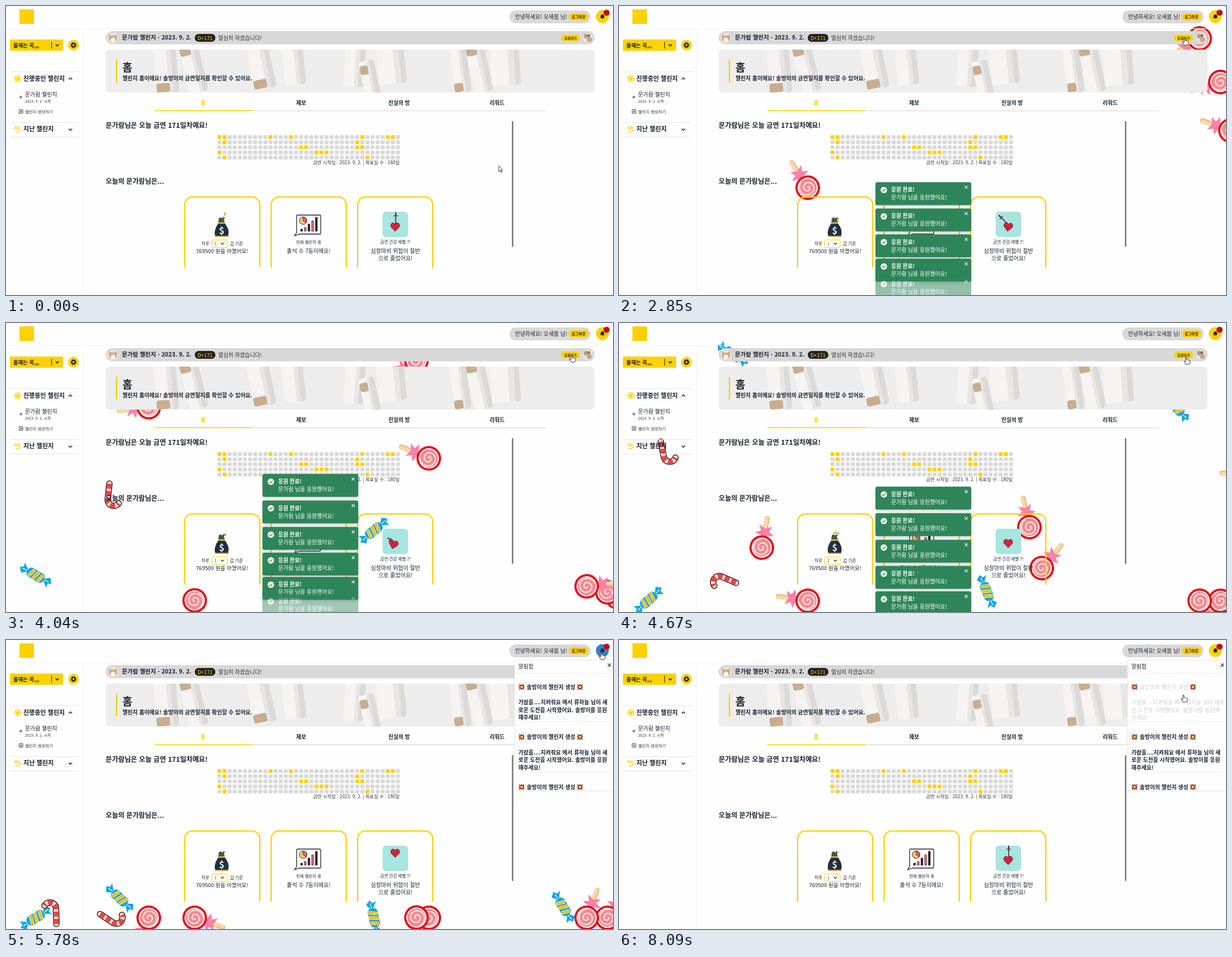
These frames come from a looping animation (1084x517 px, 8.16 s). An HTML page:

```html
<!DOCTYPE html>
<html lang="ko">
<head>
<meta charset="utf-8">
<style>
html, body { margin: 0; width: 100%; height: 100%; overflow: hidden; background: #fefefe }
svg { display: block; width: 1084px; height: 517px; font-family: "Noto Sans CJK KR", "Noto Sans KR", "Noto Sans CJK", sans-serif }
text { white-space: pre }
.toast { filter: drop-shadow(0 2px 3px #0003) }
</style>
</head>
<body>
<svg id="stage" viewBox="0 0 1084 517"></svg>
<script>
const LOOP = 8160, YELLOW = '#ffd100', INK = '#1a202c';
const stage = document.getElementById('stage');

const text = (x, y, size, str, weight = 400, fill = INK, anchor = 'start') =>
  `<text x="${x}" y="${y}" font-size="${size}" font-weight="${weight}" fill="${fill}" text-anchor="${anchor}">${str}</text>`;
const rect = (x, y, w, h, fill, r = 0, more = '') =>
  `<rect x="${x}" y="${y}" width="${w}" height="${h}" rx="${r}" fill="${fill}" ${more}/>`;
const circle = (x, y, r, fill, more = '') => `<circle cx="${x}" cy="${y}" r="${r}" fill="${fill}" ${more}/>`;
const line = (d, stroke = INK, w = 1, more = '') =>
  `<path d="${d}" fill="none" stroke="${stroke}" stroke-width="${w}" ${more}/>`;
const shape = (d, fill, more = '') => `<path d="${d}" fill="${fill}" ${more}/>`;
const place = (x, y, angle, body, opacity = 1) =>
  `<g transform="translate(${x} ${y}) rotate(${angle})" opacity="${opacity}">${body}</g>`;
const chevron = (x, y, s, w = 1.4) => line(`M${x - 3} ${y - 1.5 * s}l3 ${3 * s}l3 ${-3 * s}`, INK, w);
const cross = (x, y, c, s = 2.5) => line(`M${x - s} ${y - s}l${2 * s} ${2 * s}m0 ${-2 * s}l${-2 * s} ${2 * s}`, c, 1.1);

// ---- page ----
function topBar() {
  return line('M0 40.5H1084M138.5 40V517', '#f1f1f1') +
    rect(24, 6, 26, 26, YELLOW) +
    rect(899, 8, 145, 23, '#d9d9d9', 11.5) +
    text(909, 23, 9.8, '안녕하세요! 오새봄 님!', 500) +
    rect(1005, 13, 35, 12.5, YELLOW, 6) + text(1022.5, 22, 6.7, '로그아웃', 700, INK, 'middle');
}

function sidebar() {
  return rect(7, 60, 95, 20, YELLOW, 1) + text(13, 73.5, 9.4, '올해는 꼭,,,', 700) +
    line('M81.5 64V76') + chevron(91.5, 70, 1, 1.6) +
    circle(120.5, 70, 9.5, YELLOW) +
    circle(120.5, 70, 2.9, 'none', `stroke="${INK}" stroke-width="2"`) +
    circle(120.5, 70, 4.2, 'none', `stroke="${INK}" stroke-width="1.6" stroke-dasharray="1.9 1.4"`) +
    line('M7 117.5H130M7 208.5H130M7 234.5H130', '#e2e6ea') +
    circle(21, 130, 5.3, '#fff6cc', `stroke="${YELLOW}" stroke-width="1.3"`) +
    shape('M21 127l3 2.2l-1.2 3.5h-3.6l-1.2-3.5z', YELLOW) +
    line('M21 127v-2M24 129l2-1M22.8 133l1 2M19.2 133l-1 2M18 129l-2-1', YELLOW) +
    text(31, 134, 11, '진행중인 챌린지', 700) + chevron(115, 130, -1) +
    circle(26.5, 163, 2.4, '#8a8a8a') +
    text(34, 162, 9.9, '문가람 챌린지', 500) + text(34, 172.5, 6.75, '2023. 9. 2. 시작', 400, '#333') +
    line('M23.5 185.5h6.5v6.5h-6.5zM24.8 188.8h4M26.8 186.8v4', '#333', .9) +
    text(34, 191.5, 7.4, '챌린지 생성하기', 400, '#333') +
    line('M17 218a4.7 4.7 0 1 1 0 5.5M15.5 215.5l1 3.5h3.5M21.5 218v3l2 1', YELLOW, 1.3) +
    text(31, 224, 11.1, '지난 챌린지', 700) + chevron(115, 221, 1);
}

function banner() {
  // x, y, tilt, width, coloured end (-1 top, 1 bottom)
  const sticks = [[281, 112, -5, 30, 1], [330, 112, -14, 24, -1], [450, 106, -12, 30, 1], [508, 98, -6, 28, -1],
    [618, 100, 4, 26, 0], [648, 146, -12, 18, -1], [682, 96, -6, 40, 0], [806, 112, -8, 20, 1],
    [840, 112, -12, 24, -1], [886, 98, -4, 42, 0]];
  const stick = ([x, y, tilt, w, end]) => place(x, y, tilt,
    rect(w / 2 - 4, -48, 14, 92, '#dcdad8', 6) + rect(-w / 2, -48, w, 92, '#f5f4f2', 3) +
    rect(w / 4, -48, w / 4, 92, '#e8e6e4', 3) +
    (end ? rect(-w / 2, end > 0 ? 26 : -40, w * .8, 16, '#c8ad90', 4) : ''));
  return `<clipPath id="frame">${rect(178, 78, 873, 77, '#000', 7)}</clipPath><g clip-path="url(#frame)">` +
    rect(178, 78, 873, 77, '#ededed') + sticks.map(stick).join('') +
    '</g>' + rect(196, 96, 2.5, 41, YELLOW) +
    text(208, 117, 19, '홈', 700) +
    text(208, 133, 9.85, '챌린지 홈이에요! 솔방이의 금연일지를 확인할 수 있어요.', 700);
}

function challengeBar() {
  return rect(178, 45, 873, 23.5, '#d8d8d8', 11.7) +
    circle(191, 57, 9.3, '#e9e2d8') + shape('M184 51l4 2h6l4-2v9q-7 8-14 0z', '#d2aa84') +
    shape('M187 59q4-5 8 0l-1 5h-6z', '#fff8ee') +
    text(207, 60, 10.5, '문가람 챌린지 - 2023. 9. 2.', 700) +
    rect(337, 50, 37, 14, '#222', 7) + text(355.5, 60.5, 9.3, 'D+171', 400, YELLOW, 'middle') +
    text(379, 60.5, 9.75, '열심히 하겠습니다!', 400, '#333') +
    rect(991, 51, 34, 12, YELLOW, 6) + text(1008, 59.5, 6, '응원하기', 700, INK, 'middle') +
    circle(1039, 57, 9, '#e8e2d8') + circle(1036, 54, 4, '#b39b80') + circle(1042, 60, 4.5, '#bfa88c') +
    circle(1041, 53, 2.5, '#857260');
}

function tabs() {
  const names = ['홈', '제보', '진실의 방', '리워드'];
  return line('M265 187.5H964', '#d5d2c6') + line('M265 187.3H440', YELLOW, 1.4) +
    names.map((name, i) => text(352 + i * 175, 177, 9.7, name, 700, i ? INK : YELLOW, 'middle')).join('');
}

function calendar() {
  const missed = [[0, 1, 10, 14, 28, 33, 34], [1, 27], [16, 17, 27, 28], [0, 19, 20, 21], [1, 29]];
  let out = text(178, 218, 12.2, '문가람님은 오늘 금연 171일차예요!', 700);
  missed.forEach((days, row) => {
    for (let col = 0; col < 36; col++)
      out += rect(377.6 + col * 9.11, 231 + row * 9.15, 7.2, 7, days.includes(col) ? YELLOW : '#d9d9d9', 2);
  });
  return out + text(703, 283, 8.3, '금연 시작일 : 2023. 9. 2. | 목표일 수 : 180일', 400, '#333', 'end') +
    rect(903.5, 206, 2.5, 225, '#757575', 1);
}

function cards() {
  const mid = (x, y, size, str, w = 700) => text(x, y, size, str, w, INK, 'middle');
  const bars = [4, 7, 13, 19, 25].map((h, i) =>
    rect(526 + i * 6.6, 403 - h, 3.6, h, i % 2 ? '#e2607c' : '#222', .5, 'stroke="#222" stroke-width=".6"')).join('');
  return text(178, 318, 12.1, '오늘의 문가람님은...', 700) +
    '<clipPath id="cut"><path d="M300 330H780V468H300z"/></clipPath><g clip-path="url(#cut)">' +
    [319, 473.5, 628].map(x => rect(x, 341.6, 134.2, 150, 'none', 14, `stroke="${YELLOW}" stroke-width="2.3"`)).join('') + '</g>' +
    '<g id="bills"></g>' +
    shape('M379 389h12l-2-8l3-2l-4-1l-2 2l-3-2l-3 2z', '#3d5945') +
    shape('M379 389h12q9 12 6 21q-2 3-12 3t-12-3q-2-9 6-21z', '#20303f') +
    rect(378.5, 387, 13, 2.5, '#e6b84a', 1) + rect(373, 411, 25, 2, '#c99b45', 1) +
    text(385.3, 407.5, 16, '$', 700, '#fff', 'middle') +
    text(349, 428, 7.5, '하루') + rect(367.5, 418.5, 27.5, 13.5, '#fff', 2, `stroke="${YELLOW}"`) +
    text(372, 428, 7.5, '1', 400, '#555') + chevron(386.5, 425, .9, 1.2) + text(400, 428, 7.7, '갑 기준') +
    mid(386, 442, 9.6, '769500 원을 아꼈어요!', 500) +
    shape('M521 374H560q2 0 2 2V406q0 2-2 2H524L515.5 411L519 405V376q0-2 2-2z', '#fff', 'stroke="#222" stroke-width="1.3"') +
    circle(530.5, 384, 6.8, '#f0c56c', 'stroke="#222" stroke-width=".9"') +
    shape('M530.5 384V377.2A6.8 6.8 0 0 1 536 388z', '#e2607c', 'stroke="#222" stroke-width=".7"') + bars +
    mid(540.5, 425, 7.4, '전체 챌린저 중', 400) + mid(540.5, 442, 9.9, '출석 수 7등이에요!', 500) +
    rect(672.5, 368, 45.5, 45.5, '#a7e5df', 6) + '<g id="heart"></g>' +
    mid(695.5, 425, 7.5, '금연 건강 레벨 7!', 400) +
    mid(695.5, 442, 9.95, '심장마비 위험이 절반', 500) + mid(695.5, 455, 10, '으로 줄었어요!', 500);
}

stage.innerHTML = '<g id="candies"></g>' + topBar() + sidebar() + challengeBar() + banner() + tabs() + calendar() + cards() +
  ['toasts', 'drawer', 'bell', 'cursor'].map(id => `<g id="${id}"></g>`).join('');

// ---- motion ----
const show = (id, html) => { document.getElementById(id).innerHTML = html; };

// Interpolates rows of [time, ...values].
function tween(rows, t) {
  let i = 0;
  while (i < rows.length - 2 && t >= rows[i + 1][0]) i++;
  const [a, b] = [rows[i], rows[i + 1]];
  const u = Math.min(1, Math.max(0, (t - a[0]) / (b[0] - a[0]))), e = u * u * (3 - 2 * u);
  return a.slice(1).map((v, k) => v + (b[k + 1] - v) * e);
}

const swirl = Array.from({ length: 42 }, (_, i) => {
  const a = i * .3, r = 1 + i * .36;
  return `${i ? 'L' : 'M'}${(r * Math.cos(a)).toFixed(1)} ${(r * Math.sin(a)).toFixed(1)}`;
}).join('');
const caneLine = 'M21 1L-7 -8A11 11 0 0 0 -17 10';
const sweets = {
  lolli: line('M20 0H53', '#e9bd85', 9, 'stroke-linecap="round"') + line('M20 -1H53', '#f8d9a8', 6, 'stroke-linecap="round"') +
    shape('M20 0L25 -17L30 -7L40 -12L35 0L40 12L30 7L25 17z', '#f882a8') +
    circle(0, 0, 22, '#e60a18') + circle(0, 0, 18, '#fff') + circle(0, 0, 16, '#f58a92') + line(swirl, '#fde0dd', 2.4),
  wrap: shape('M-14 0L-28 -10L-26 -3L-32 1L-25 9zM14 0L28 10L26 3L32 -1L25 -9z', '#12a5e2') +
    line('M-16 0L-27 1M16 0L27 -1', '#fff', 1.2) + rect(-17, -9, 34, 18, '#12a5e2', 7) +
    line('M-11 8L-6 -8M-2 9L3 -9M8 8L12 -7', '#fff', 6) + line('M-11 8L-6 -8M-2 9L3 -9M8 8L12 -7', '#fbc000', 4.6),
  cane: line(caneLine, '#3b2228', 11.5, 'stroke-linecap="round"') + line(caneLine, '#fbe3c0', 8.5, 'stroke-linecap="round"') +
    line(caneLine, '#e0464f', 8.5, 'stroke-dasharray="9 4"')
};
// kind, x, start time, starting angle
const candies = [
  ['lolli', 337, 2147, 110], ['lolli', 1092, 2387, 72], ['lolli', 1074, 2547, 35], ['lolli', 1037, 2670, 22],
  ['wrap', 53, 2829, 59], ['wrap', 657, 3196, 169], ['cane', 188, 3382, -73], ['lolli', 755, 3537, 232],
  ['lolli', 255, 3712, 202], ['lolli', 733, 3846, 179], ['lolli', 1130, 4107, 102], ['cane', 84, 4190, 162],
  ['wrap', 995, 4342, 150], ['wrap', 203, 4493, -45]];

function drawCandies(t) {
  return candies.filter(c => t > c[2] && t < 7500).map(([kind, x, start, angle]) => {
    const left = Math.max(0, 1 - (t - start) / 2130);
    return place(x, 497 - 573 * left ** 3, angle + t * .171, sweets[kind]);
  }).join('');
}

function drawBills(t) {
  const u = ((t + 250) % 2100) / 1050;
  if (u > 1) return '';
  return [0, 1, 2].map(i => {
    const rise = Math.sin(Math.PI * Math.min(1, Math.max(0, u * 1.2 - i * .1)));
    return place(391 - i * 3, 383 - rise * (14 - i * 3), u * 300 + i * 70,
      rect(-3, -1.5, 6, 3, i % 2 ? '#f6d9a8' : '#f0a648', 1));
  }).join('');
}

// phase, sword x, y, angle, opacity, heart x, y, angle
const stab = [
  [0, 696, 380, 0, 1, 695, 395, 0], [300, 696, 374, 0, 0, 695, 394, 0], [600, 680, 376, -45, 0, 695, 394, 0],
  [750, 686, 382, -45, 1, 695, 395, 8], [1000, 680, 376, -45, 0, 695, 394, 0], [1580, 714, 370, 135, 0, 695, 381, 0],
  [1660, 708, 379, 135, 1, 695, 394, 0], [1790, 696, 379, 0, 1, 695, 394, 0], [1940, 690, 391, -50, 1, 692, 396, 15],
  [2100, 696, 380, 0, 1, 695, 395, 0]];
const sword = rect(-1, -4, 2, 14, '#4d4f63') + rect(-4, -5.5, 8, 1.8, '#8a2b4c', 1) + rect(-1, -11, 2, 6, '#3a2438');
const heart = shape('M0 8L-7.5 0Q-9 -6 -4 -7Q-1 -7 0 -4Q1 -7 4 -7Q9 -6 7.5 0z', '#e8203c', 'stroke="#4a1420" stroke-width=".9"') +
  circle(-2.8, -1, .8, INK) + circle(2.8, -1, .8, INK) + line('M-1.3 1.5q1.3 1.3 2.6 0', INK, .7);

function drawHeart(t) {
  const [sx, sy, sa, so, hx, hy, ha] = tween(stab, t % 2100);
  return place(sx, sy, sa, sword, so) + place(hx, hy, ha, heart);
}

const cheers = Array.from({ length: 11 }, (_, i) => 1820 + i * 240);
const push = age => 47.7 * (1 - .6 * Math.exp(-age / 40) - .4 * Math.exp(-age / 240));

function drawToasts(t) {
  const LIFE = 1480;
  return cheers.filter(s => t > s && t < s + LIFE).map(s => {
    const age = t - s;
    let y = 479 + 6 * Math.exp(-age / 250);
    for (const later of cheers) if (later > s && later < t) y -= push(t - later);
    const opacity = Math.min(1, age / 140, (LIFE - age) / 60);
    return `<g class="toast" transform="translate(458 ${y})" opacity="${opacity}">` +
      rect(0, 0, 171, 41, '#2f855a', 3) + circle(15, 14, 5.7, '#fff') + line('M12 14l2.2 2.2l4-4.4', '#2f855a', 1.3) +
      text(28, 17, 9.7, '응원 완료!', 700, '#fff') + text(28, 31, 9.9, '문가람 님을 응원했어요!', 500, '#fff') +
      cross(162, 9, '#fff') + '</g>';
  }).join('');
}

const burst = Array.from({ length: 16 }, (_, i) => {
  const r = i % 2 ? 3 : i % 4 ? 5.3 : 6.5, a = i * Math.PI / 8 + Math.PI / 4;
  return `${i ? 'L' : 'M'}${(r * Math.cos(a)).toFixed(1)} ${(r * Math.sin(a)).toFixed(1)}`;
}).join('') + 'z';
const boom = shape(burst, '#c8231c', 'stroke="#421713" stroke-width=".6"') + circle(0, 0, 2.3, '#ffc83d') + circle(0, 0, 1, '#fff3b0');
const unreadLines = ['가람을....지켜줘요 에서 류하늘 님이 새', '로운 도전을 시작했어요. 솔방이를 응원', '해주세요!'];
const readLines = ['가람을....지켜줘요 에서 류하늘 님이 새로', '운 도전을 시작했어요. 솔방이를 응원해', '주세요!'];
const READ_AT = 7200;

function drawDrawer(t) {
  if (t < 5500) return '';
  const items = [0, 1, 2].map(i => {
    const read = !i && t >= READ_AT, y = 84 + i * 89.5, fill = read ? '#cfcfcf' : INK, weight = read ? 400 : 700;
    return place(920.8, y, 0, boom) + place(1025, y, 0, boom) +
      text(930, y + 3.8, 9.8, '솔방이의 챌린지 생성', weight, fill) +
      (read ? readLines : unreadLines).map((s, k) => text(915, y + 31 + k * 13.7, 9.8, s, weight, fill)).join('') +
      line(`M915 ${y + 62.5}H1078`, '#f0f0f0');
  }).join('');
  return `<g opacity="${Math.min(1, (t - 5500) / 150)}">` +
    rect(908, 36, 180, 234, '#fefefe', 2, 'stroke="#e2e4e8"') + text(915, 50.5, 9.8, '알림함', 500) +
    cross(1077.5, 45, INK, 2.8) + line('M908 59.5H1084', '#e8eaee') +
    `<clipPath id="list"><path d="M908 60H1084V269.5H908z"/></clipPath><g clip-path="url(#list)">${items}</g></g>`;
}

function drawBell(t) {
  const hover = t > 5250 && t < 6150;
  return circle(1065, 19, 11.5, hover ? '#3182ce' : YELLOW) +
    shape('M1061 21.5q1-1 1-3.5q0-2.8 3-3q3 .2 3 3q0 2.5 1 3.5zM1063.8 22.3h2.4l-1.2 1.2z', INK) +
    circle(1072.5, 12, 5.6, '#e3121c') + text(1072.5, 15, 8, t < READ_AT ? '16' : '15', 400, '#3a0a0c', 'middle');
}

const route = [[0, 880, 286], [900, 880, 286], [1180, 965, 140], [1420, 1009, 36], [1600, 1010, 57], [4100, 1010, 57],
  [4500, 1013, 61], [4850, 1013, 61], [5300, 1063, 22], [5950, 1063, 22], [6700, 1008, 98], [LOOP, 1008, 98]];
const arrow = shape('M0 0V10.5L2.5 8.2L4.2 12L5.8 11.2L4.2 7.6H7z', '#fff', 'stroke="#222" stroke-width=".9"');
const hand = shape('M-1 1Q0 -.5 1 1V5Q2.5 4 3 5.5Q4.5 4.8 5 6Q6.5 5.5 7 7V10L5.5 13H-.5L-4 8Q-4 6.5 -2.5 7L-1 8.5z',
  '#fff', 'stroke="#222" stroke-width=".9" stroke-linejoin="round"');

const start = performance.now();
function frame() {
  const t = (performance.now() - start) % LOOP;
  show('candies', drawCandies(t));
  show('bills', drawBills(t));
  show('heart', drawHeart(t));
  show('toasts', drawToasts(t));
  show('drawer', drawDrawer(t));
  show('bell', drawBell(t));
  const [x, y] = tween(route, t);
  show('cursor', place(x, y, 0, t < 1400 ? arrow : hand));
  requestAnimationFrame(frame);
}
frame();
</script>
</body>
</html>
```
